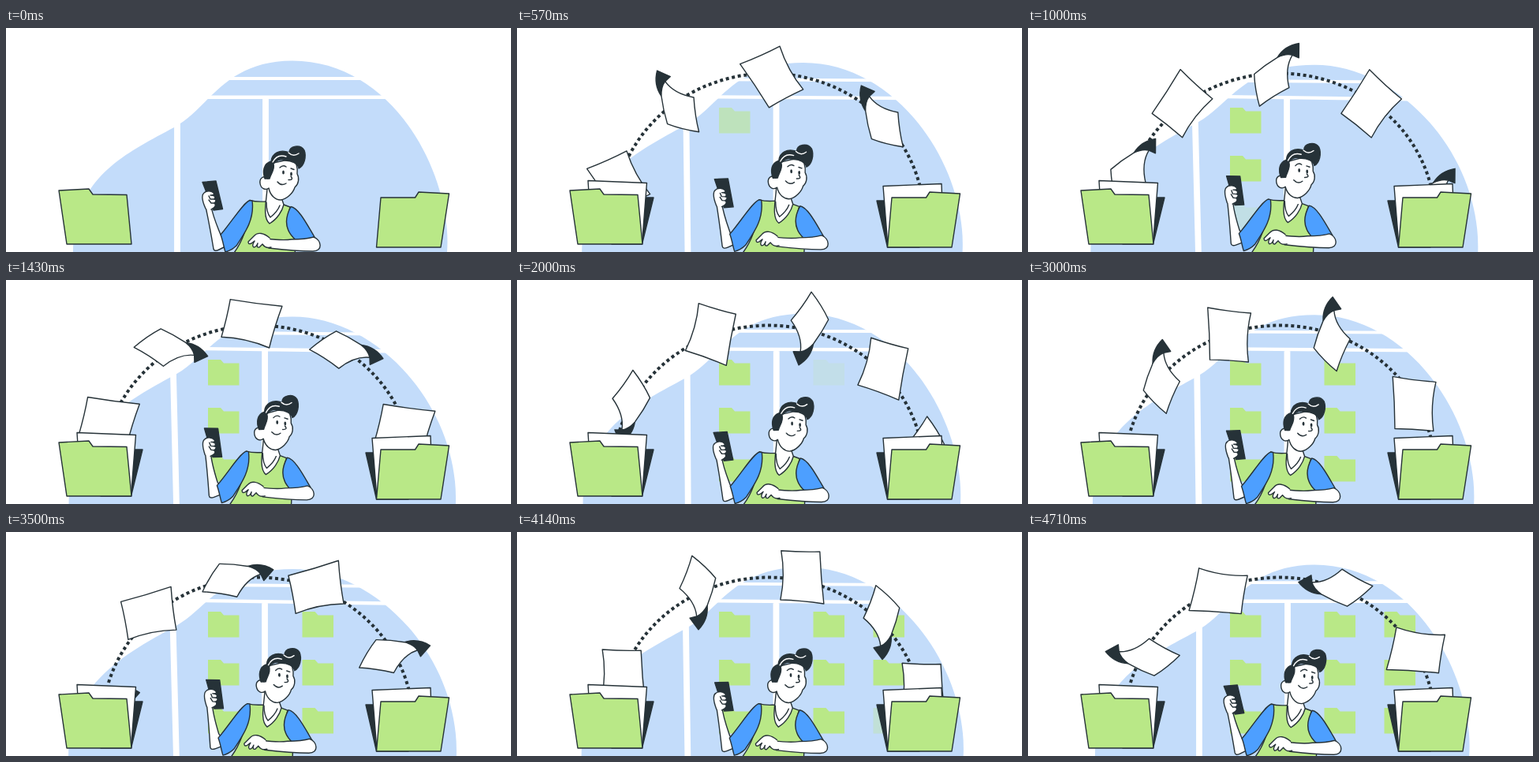
An HTML page for the animation above (4.78 s loop, 640 by 284 pixels).

```html
<!DOCTYPE html>
<html lang="en">
<head>
<meta charset="utf-8">
<title>File transfer</title>
<style>
  html, body { margin: 0; width: 100%; height: 100%; overflow: hidden; background: #fff; }
  svg { display: block; width: 100%; height: 100%; }
  .ink { stroke: #263238; stroke-width: 1.4; stroke-linejoin: round; stroke-linecap: round; }
  .white { fill: #fff; }
  .green { fill: #b9e887; }
  .blue { fill: #4d9fff; }
  .dark { fill: #263238; }
  .line { fill: none; }
</style>
</head>
<body>
<svg viewBox="0 0 640 284">
  <defs>
    <path id="flat" class="ink white" transform="translate(4 2)"
      d="M-29.5-26Q2-20 32.7-25.7Q31 0 32 23.3Q-2 25 -34 29Q-30 0-29.5-26Z"/>
    <g id="curl" class="ink" transform="translate(7 0)">
      <path class="dark" d="M-53.3 1.4L-38.7-9.7L-36.5-1Q-33 7-22.5 12.2Q-40 14-53.3 1.4Z"/>
      <path class="white" d="M-36.5-1Q-17.5-3-1.2-23Q20-13 40.3-7.7Q27 10 12.2 22.5Q-5 19-22.5 12.2Q-33 7-36.5-1Z"/>
    </g>
    <path id="icon" class="green" d="M0 0H16L20 4.5H39.5V32.5H0Z"/>
  </defs>

  <path id="blob" fill="#c3dcfa"/>
  <path id="bars" class="white" stroke="#fff" stroke-width="2.800"/>
  <g id="wall"></g>

  <g class="transfer">
    <path class="line" stroke="#263238" stroke-width="4" stroke-dasharray="4 3.700"
      d="M130 191A197 186 0 0 1 510.500 200"/>
    <path class="ink dark" d="M120 215H173L158.500 274H120ZM510 219H456L469.500 278H510Z"/>
  </g>
  <g id="papers" class="transfer"></g>
  <path class="transfer ink white" d="M90 193.500L164.500 196.500L158.500 273H95ZM464 200.500L538 197.500L541 277H470Z"/>
  <path class="ink green" d="M67 206L105 204L110 211L153 211.500L159 274H77Z"/>
  <path class="ink green" d="M475 215H518.500L523 208L561.500 210L551 278H469.500Z"/>

  <g id="arm" class="ink">
    <path class="white" d="M252 222C256 240 260 262 263 280Q264 284 270 281L284 274L272 262C267 250 262 238 260 226Z"/>
    <path class="dark" d="M249 195.500L266 194L274.500 229.500L263 231Z"/>
    <path class="white" d="M253 229C249 220 247 212 251 209C254 206 260 206 263 209Q265 212 259 212Q267 212 264 217Q268 218 264 222Q267 225 263 228L260 230"/>
    <path class="line" d="M257 213L259 217L264 217M257 218L260 222H264"/>
  </g>
  <g id="body" class="ink">
    <path class="green" d="M309 218.500C318 221 324 220 330 220L352 224L360 227C354 245 358 258 367 268L366 290H285C298 275 309 250 309 218.500Z"/>
    <path class="blue" d="M309 218.500C301 221 286 246 272 262C275 270 276 278 278 284Q286 282 292 276C304 258 315 242 312 219Z"/>
    <path class="white" d="M331 202C331 215 324 240 334 248C344 242 350 232 352 224L348 212Z"/>
    <path class="line" d="M330 221Q330 234 335 240Q344 233 347 225"/>
    <path class="blue" d="M361 226.500C371 228 382 250 391 265Q382 269 367 268.500C355 258 351 245 361 226.500Z"/>
    <g id="hand" class="white">
      <path d="M362 268Q380 268 390 265C400 269 402 283 389 283C372 283 350 281 333 279L330 267C345 269 355 269 362 268Z"/>
      <path d="M334 266C327 260 319 258 314 264L307 271Q307 275 311 273L315 270Q311 276 314 278Q317 278 319 273Q317 279 321 278L325 274Q329 280 336 278"/>
    </g>
    <g id="head">
      <path class="white" d="M334 172L332 191C327 186 321 190 322 197C323 204 329 206 333 203C335 213 342 218 348 218C356 217 364 209 366 202C371 198 372 190 369 185C370 178 368 168 362 166Z"/>
      <path class="dark" d="M328 191C325 182 326 172 336 169C337 159 347 153 359 158C359 149 373 147 378 155C381 163 378 175 371 178C370 172 362 168 354 168C348 165 342 168 339 172C341 180 336 184 334 191Z"/>
      <path class="line" style="stroke:#fff" d="M338 170Q344 159 355 163M358 158Q364 164 371 159"/>
      <g class="dark" stroke="none">
        <ellipse cx="351.500" cy="183" rx="1.400" ry="2.500"/>
        <ellipse cx="361.500" cy="185" rx="1.400" ry="2.500"/>
      </g>
      <path class="line" d="M347 177Q351 173 355 176M361 178L365 179.500M361 188Q365 193 358 192.500M344 195Q349 201 355 197"/>
    </g>
  </g>
</svg>
<script>
const LOOP = 4780, STEPS = 67;
const $ = id => document.getElementById(id);
const move = (el, value) => el.setAttribute('transform', value);
const mix = (a, b, k) => a + (b - a) * k;
const ease = k => (1 - Math.cos(Math.PI * k)) / 2;

function addUse(parent, id) {
  const el = document.createElementNS('http://www.w3.org/2000/svg', 'use');
  el.setAttribute('href', '#' + id);
  return parent.appendChild(el);
}

// Seconds at which each sheet leaves the left folder
const papers = [-1.535, -1.044, -.519, -.063, .373, .755, 1.195, 1.69, 2.142, 2.512, 2.93, 3.39, 3.925, 4.381]
  .map((start, i) => ({ start, el: addUse($('papers'), i % 2 ? 'curl' : 'flat') }));

const icons = [256, 375.5, 451.5].flatMap((x, col) => [0, 1, 2].map(row => {
  const el = addUse($('wall'), 'icon');
  move(el, `translate(${x} ${101 + 61 * row})`);
  return { el, start: .4 + 1.55 * col + .27 * row };
}));

const blobRest = [85, 284, 85, 190, 150, 160, 213, 126, 258, 102, 275, 42, 363, 41.5, 494, 42, 566, 190, 559, 284];
const blobWide = [79, 284, 79, 195, 150, 155, 210, 122, 255, 100, 270, 47, 363, 47, 470, 47, 575, 160, 571, 284];

const swayKeys = [[0, 0], [1.2, 1], [2.45, .08], [3.8, .68], [4.78, .15]];
function sway(t) {
  const i = Math.max(1, swayKeys.findIndex(key => key[0] >= t));
  const [t0, a] = swayKeys[i - 1], [t1, b] = swayKeys[i];
  return mix(a, b, ease((t - t0) / (t1 - t0)));
}

function drawRoom(m) {
  const p = blobRest.map((v, i) => mix(v, blobWide[i], m));
  $('blob').setAttribute('d', `M${p.slice(0, 2)}C${p.slice(2)}Z`);
  $('bars').setAttribute('d',
    `M250 ${63.5 + 3 * m}L480 ${63.5 + 5 * m}v1L250 ${64.5 + 3 * m}Z` +
    `M230 ${87 - m}L500 ${87 + 3 * m}v1.5L230 ${88.5 - m}Z` +
    `M${214.5 - 6 * m} 100h5L${219.5 - m} 290h-5Z` +
    `M${326.5 - m} 89h5V290h-5Z`);
}

function drawPapers(t) {
  const turn = 161.6 * t - 35 + 4 * Math.sin(2 * Math.PI * t / 2.23);
  for (const { start, el } of papers) {
    const angle = 84 * (t - start);
    const rad = angle * Math.PI / 180;
    el.style.display = angle > 4 && angle < 182 ? '' : 'none';
    move(el, `translate(${319 - 197 * Math.cos(rad)} ${243 - 186 * Math.sin(rad)}) rotate(${turn})`);
  }
}

function drawMan(s, m) {
  move($('body'), `translate(${-5 * s} ${-1.5 * s})`);
  move($('head'), `translate(${-2 * s} ${-s}) rotate(${-3 * s} 345 210)`);
  move($('hand'), `translate(${-3.5 * s} ${-3 * s})`);
  move($('arm'), `translate(${6 * m - 5 * s} ${-7 * m}) rotate(${6 * m} 262 212)`);
}

const transfer = document.querySelectorAll('.transfer');
function render(now) {
  const step = Math.min(STEPS - 1, Math.floor((now % LOOP + 3) / LOOP * STEPS));
  const t = step / STEPS * LOOP / 1000;
  const breath = ease(t / 1.195);
  transfer.forEach(el => el.style.display = step ? '' : 'none');
  drawRoom(breath);
  drawPapers(t);
  drawMan(sway(t), breath);
  for (const { el, start } of icons) el.style.opacity = Math.min(1, Math.max(0, (t - start) / .32));
}

const begin = performance.now();
function tick() {
  render(performance.now() - begin);
  requestAnimationFrame(tick);
}
tick();
</script>
</body>
</html>
```
